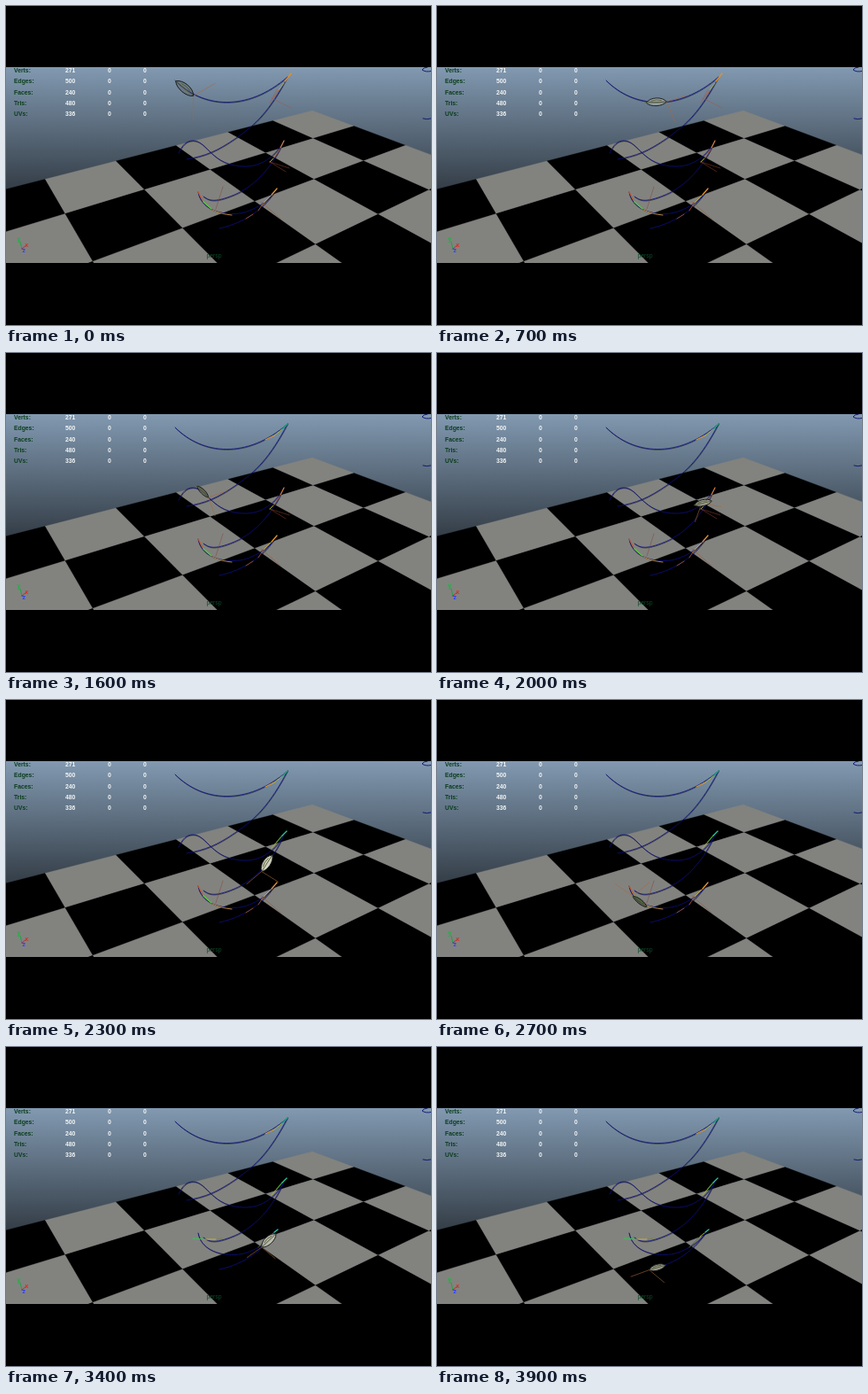
Animation, 480 px wide and 360 px high, one loop 5100 ms. Source, as an HTML page:

```html
<!DOCTYPE html>
<html lang="en">
<head>
<meta charset="utf-8">
<title>Falling leaf on a motion path</title>
<style>
html, body { margin: 0; width: 100%; height: 100%; overflow: hidden; background: #000; }
svg { display: block; width: 100vw; height: 100vh; }
text { font-family: "Liberation Sans", Arial, sans-serif; font-size: 6.8px; }
.bold { font-weight: bold; }
.label { fill: #0a3d1c; }
.value { fill: #f2f5f5; }
.line { fill: none; stroke-linecap: round; stroke-linejoin: round; }
</style>
</head>
<body>
<svg viewBox="0 0 480 360" preserveAspectRatio="none">
  <defs>
    <linearGradient id="sky" gradientUnits="userSpaceOnUse" x1="0" y1="66" x2="0" y2="290">
      <stop offset="0" stop-color="#839bb3"/>
      <stop offset="1" stop-color="#050607"/>
    </linearGradient>
    <clipPath id="view"><rect y="69" width="480" height="221"/></clipPath>
  </defs>
  <rect width="480" height="360"/>
  <g clip-path="url(#view)">
    <rect y="69" width="480" height="221" fill="url(#sky)"/>
    <g id="floor"></g>
    <g id="trail"></g>
    <path class="line" stroke="#0a1070" stroke-width=".9"
      d="M476 69Q471 69.5 470 72Q474 75 480 73.5M471 127Q475 128.5 480 127"/>
    <g id="handles"></g>
    <g id="leaf">
      <path id="axes" class="line" stroke="#a8683c" stroke-width=".6"/>
      <g id="body">
        <path id="shell" stroke="#15191a" stroke-width=".9"/>
        <path id="vein" class="line" stroke="#4d5a2c" stroke-width=".8"/>
      </g>
    </g>
    <g id="hud" class="bold"></g>
    <text x="235" y="284" text-anchor="middle" fill="#0b4a28">persp</text>
    <g class="line" stroke-width=".9">
      <path d="M18 274L16 266" stroke="#12a83a"/>
      <path d="M18 274L23 270" stroke="#c02a22"/>
      <path d="M18 274L21 275" stroke="#2636e0"/>
    </g>
    <g class="bold">
      <text x="12.5" y="265" fill="#14b83c">y</text>
      <text x="21.5" y="271.5" fill="#d83028">x</text>
      <text x="18.5" y="278" fill="#3040ff">z</text>
    </g>
  </g>
</svg>
<script>
const $ = id => document.getElementById(id);

function add(parent, tag, attrs, text) {
  const el = document.createElementNS("http://www.w3.org/2000/svg", tag);
  for (const k in attrs) el.setAttribute(k, attrs[k]);
  if (text !== undefined) el.textContent = text;
  return parent.appendChild(el);
}
const stroke = (parent, d, color, width) =>
  add(parent, "path", { d, class: "line", stroke: color, "stroke-width": width });

// Checkerboard seen in perspective
const depth = (i, j) => 1 - 0.06125 * i - 0.096 * j;
function corner(i, j) {
  const w = depth(i, j);
  return [(346 - 63.1 * i + 9.3 * j) / w, (118 + 3.53 * i + 4.5 * j) / w];
}
function drawFloor() {
  for (let i = 0; i < 7; i++) for (let j = 0; j < 5; j++) {
    if (depth(i + 1, j + 1) < 0.08) continue;
    const pts = [corner(i, j), corner(i + 1, j), corner(i + 1, j + 1), corner(i, j + 1)];
    const color = (i + j) % 2 ? "#000" : "#82837f";
    add($("floor"), "polygon", { points: pts.join(" "), fill: color, stroke: color, "stroke-width": 0.3 });
  }
}

function drawHud() {
  const rows = [["Verts:", 271], ["Edges:", 500], ["Faces:", 240], ["Tris:", 480], ["UVs:", 336]];
  rows.forEach(([name, n], k) => {
    const y = 75.2 + k * 12.2;
    add($("hud"), "text", { x: 9, y, class: "label" }, name);
    [[67, n], [115, 0], [155, 0]].forEach(([x, v]) => add($("hud"), "text", { x, y, class: "value" }, v));
  });
}

// Swings of the fall, each from one turning point to the next
const swings = [
  "M191 84C222 115 272 120 318 80",
  "M318 80C298 118 282 134 260 149S226 169 204 173",
  "M195 166C199 157 204 152 211 152C228 152 232 181 270 181C291 181 305 168 314 152",
  "M314 152C302 180 282 203 258 213S229 219 223 215",
  "M217 210C220 228 240 235 258 234.5S296 222 306 206",
  "M306 206C292 228 272 244 241 251"
].map(d => {
  const shade = stroke($("trail"), d, "#05070c", 0.5);
  shade.setAttribute("transform", "translate(.4 .7)");
  return stroke($("trail"), d, "#0c0f80", 0.8);
});

// Tangent handles: one look before the leaf passes the turn, one after
const turns = [
  { u: 1,
    before: [["M300 104L322 115M306 94L298 110", "#a3553c", .5], ["M322 76L315 85", "#e0902c", 1.4],
             ["M314 87L308 95", "#a8a83a", 1], ["M308 95L303 103", "#b5582c", .8]],
    after: [["M293 98L303 93", "#d89a30", 1.1], ["M303 93L312 86", "#a8b83c", 1], ["M312 86L318 80", "#22a878", 1.3]] },
  { u: 3,
    before: [["M298 176L316 187M298 176L320 183", "#96442e", .5], ["M314 152L310 160", "#e08a2a", 1.1],
             ["M309 162L303 171", "#b05a2a", .8], ["M302 172L298 176", "#a8b040", 1]],
    after: [["M317 148L312 153", "#2cc49a", 1.3], ["M312 153L306 160", "#58c83c", 1.1], ["M306 160L300 167", "#a8b838", .9]] },
  { u: 4.7,
    before: [["M237 229L245 204", "#86423a", .5], ["M217 210L222 219", "#c85a2c", 1.1],
             ["M223 221L232 229", "#58c83c", 1.3], ["M233 230Q243 235 255 236", "#c89438", .9]],
    after: [["M211 216L224 217", "#3cc05a", 1.2], ["M225 217L237 217", "#c8b038", 1], ["M238 217L244 216", "#708038", .7]] },
  { u: 5,
    before: [["M288 221L310 240", "#96502e", .5], ["M306 206L300 213", "#e0922c", 1.3],
             ["M299 214L291 222", "#c8a838", 1], ["M290 223L285 231M279 235L271 240", "#b05c2a", .8]],
    after: [["M307 206L303 209", "#2cc4a0", 1.3], ["M302 210L297 214", "#a8b83c", 1], ["M296 215L285 226", "#5a6a34", .8]] }
];
for (const t of turns) for (const side of ["before", "after"]) {
  const g = add($("handles"), "g", {});
  t[side].forEach(s => stroke(g, ...s));
  t[side] = g;
}

// step, place along the swings
const travel = [[0, .1], [3, .45], [6, 1], [10.7, 2], [12, 2.24], [17, 3], [19, 3.31],
  [22.2, 4], [23, 4.2], [29, 5], [30, 5.19], [35, 5.9]];
// step, angle, length, width, light, opacity, pivot side, two axis angles, axis length
const poses = [
  [0, 40, 26, 10, .3, .35, 1, -30, 90, 28],
  [3, -3, 23, 9, .8, .5, 1, -17, 67, 24],
  [12, 45, 18, 5, .35, .7, 1, -20, 70, 22],
  [19, -57, 22, 9, 1, .9, -1, 32, 140, 22],
  [23, 38, 20, 5, .12, .5, -1, 215, -40, 24],
  [30, -43, 22, 9, .86, .8, -1, 40, 145, 20],
  [35, -16, 19, 7, .8, .8, -1, 40, 160, 22]
];

function sample(rows, n) {
  let k = 1;
  while (k < rows.length - 1 && n > rows[k][0]) k++;
  const a = rows[k - 1], b = rows[k], f = (n - a[0]) / (b[0] - a[0]);
  return a.map((v, i) => v + (b[i] - v) * f).slice(1);
}

function pointAt(u) {
  const k = Math.min(Math.floor(u), swings.length - 1);
  return swings[k].getPointAtLength(swings[k].getTotalLength() * (u - k));
}

function draw(n) {
  const [u] = sample(travel, n);
  const [angle, len, wid, light, opacity, side, a1, a2, reach] = sample(poses, n);
  const p = pointAt(u), rad = Math.PI / 180, h = len / 2;
  const px = p.x + Math.cos(angle * rad) * h * side;
  const py = p.y + Math.sin(angle * rad) * h * side;
  const arm = a => `M${px} ${py}l${Math.cos(a * rad) * reach} ${Math.sin(a * rad) * reach}`;
  $("axes").setAttribute("d", arm(a1) + arm(a2));
  $("body").setAttribute("transform", `translate(${p.x} ${p.y}) rotate(${angle})`);
  $("shell").setAttribute("d", `M${-h} 0C${-h * .6} ${-wid * .7} ${h * .6} ${-wid * .7} ${h} 0C${h * .6} ${wid * .6} ${-h * .6} ${wid * .6} ${-h} 0Z`);
  const c = f => Math.round(30 + f * light);
  $("shell").setAttribute("fill", `rgb(${c(200)},${c(198)},${c(180)})`);
  $("shell").setAttribute("fill-opacity", opacity);
  $("vein").setAttribute("d", `M${-h} 0H${h}M${-h * .5} ${-wid * .2}Q0 ${-wid * .4} ${h * .5} ${-wid * .2}`);
  for (const t of turns) {
    t.before.setAttribute("visibility", u < t.u ? "visible" : "hidden");
    t.after.setAttribute("visibility", u < t.u ? "hidden" : "visible");
  }
}

// Steps of 100 ms, with a pause early on and a rest at the end
function stepAt(ms) {
  const k = Math.floor(ms / 100);
  return k < 7 ? Math.min(k, 2) : Math.min(k - 4, 35);
}

drawFloor();
drawHud();
const start = performance.now();
function tick() {
  draw(stepAt((performance.now() - start) % 5100));
  requestAnimationFrame(tick);
}
tick();
</script>
</body>
</html>
```
